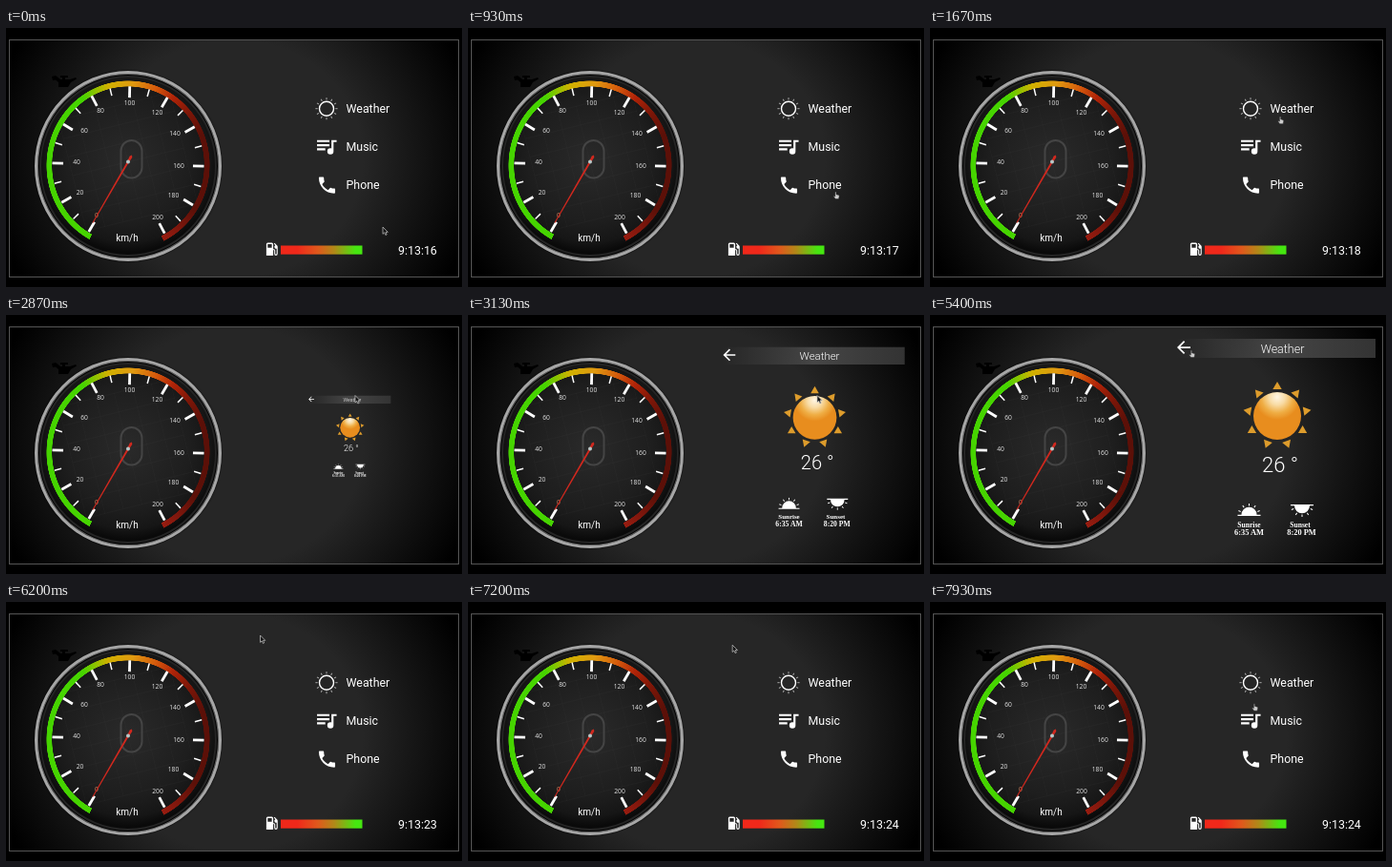
Animation, 478 px wide and 272 px high, one loop 8 s. Source, as an HTML page:

```html
<!DOCTYPE html>
<html lang="en">
<head>
<meta charset="utf-8">
<title>Dashboard</title>
<style>
html, body { margin: 0; width: 478px; height: 272px; overflow: hidden; background: #000; }
div, svg { position: absolute; box-sizing: border-box; }
#panel { left: 3px; top: 12px; width: 472px; height: 250px; border: 1px solid #555;
  background: radial-gradient(ellipse 260px 240px, #262626 52%, #000); }
#ring { left: 30px; top: 45px; width: 196px; height: 200px; border: 3px solid #a6a6a6; border-radius: 50%;
  background: radial-gradient(circle at 50% 47%, #2a2a2a, #1e1e1e 65px, #161616 86px, #0a0a0a 96px);
  box-shadow: inset 0 0 0 1px #555, inset 0 0 0 2px #000, inset 0 0 0 4px #242424, 0 0 2px #000; }
#arc { left: 42px; top: 57.5px; width: 172px; height: 172px; transform: rotate(1.2deg) scaleY(1.035);
  background: conic-gradient(from -153deg, #46d400 0 117deg, #d0b000 137deg, #e09a10 155deg,
    #d45a0c 172deg, #b02408 186deg, #7a1608 203deg, #5c1008 220deg 275deg, #981c10 306deg, transparent 306deg);
  -webkit-mask: radial-gradient(circle, transparent 79.5px, #000 80px 85.3px, transparent 85.8px);
  mask: radial-gradient(circle, transparent 79.5px, #000 80px 85.3px, transparent 85.8px); }
svg { left: 0; top: 0; }
text { fill: #fff; font: 300 12.5px Roboto, sans-serif; }
#menu text { font-weight: 400; font-size: 12.4px; }
.mid text, text.mid { text-anchor: middle; }
#labels text { font: 6.7px "Open Sans", sans-serif; fill: #e6e6e6; text-anchor: middle; }
#weather .small { font: bold 7.6px "Liberation Serif", serif; }
#weather .hour { font: bold 8.4px "Liberation Serif", serif; }
</style>
</head>
<body>
<div id="panel"></div>
<div id="ring"></div>
<div id="arc"></div>
<svg width="478" height="272" viewBox="0 0 478 272">
  <defs>
    <linearGradient id="fuel">
      <stop offset=".2" stop-color="#f0281a"/><stop offset=".45" stop-color="#e0581c"/>
      <stop offset=".66" stop-color="#b08a18"/><stop offset=".92" stop-color="#45e610"/>
    </linearGradient>
    <linearGradient id="bar">
      <stop offset="0" stop-color="#444" stop-opacity="0"/><stop offset=".5" stop-color="#464646"/><stop offset="1" stop-color="#333"/>
    </linearGradient>
    <radialGradient id="glow" gradientUnits="userSpaceOnUse" cx="364" cy="86" r="24">
      <stop offset="0" stop-color="#fff6e4"/><stop offset=".35" stop-color="#f8dca6"/>
      <stop offset=".7" stop-color="#efae45"/><stop offset="1" stop-color="#e88d1e"/>
    </radialGradient>
  </defs>

  <path d="M48 51l4-1 5 4h2v-2h-2v-2h8v2h-3v2h5l6-2 1 1.5-6 3.5-3 5H55v-5l-3-2.500-3 .5z"/>
  <g id="grid" stroke="#fff" stroke-opacity=".02" transform="rotate(-14 128 140.500)"></g>
  <rect x="120.500" y="118" width="22" height="39.500" rx="11" fill="none" stroke="#444" stroke-width="2"/>
  <g id="marks" transform="translate(128 143.500) rotate(1.200) scale(1 1.035)"></g>
  <g id="labels"></g>
  <text class="mid" x="127" y="224.300" style="font-weight:400;font-size:10px">km/h</text>
  <path d="M0-8L1.500-6 1 0 .5 74H-.5L-1 0-1.500-6z" fill="#d0281e" transform="translate(128 140.500) rotate(30)"/>
  <circle cx="128" cy="140.500" r="2" fill="#b9c8c8"/>

  <g id="menu" fill="#fff">
    <circle cx="336" cy="84.700" r="7.500" fill="none" stroke="#fff" stroke-width="1.400"/>
    <g id="rays" opacity=".6"></g>
    <path transform="translate(322.800 111.200) scale(1.080)" d="M15 6H3v2h12zm0 4H3v2h12zM3 16h8v-2H3zM17 6v8.180c-.31-.11-.65-.18-1-.18a3 3 0 1 0 3 3V8h3V6z"/>
    <path transform="translate(325.100 153.700) scale(.95)" d="M6.620 10.790c1.440 2.830 3.760 5.140 6.590 6.590l2.200-2.200c.27-.27.67-.36 1.020-.24 1.120.37 2.330.57 3.570.57.55 0 1 .45 1 1V20c0 .55-.45 1-1 1C10.610 21 3 13.390 3 4c0-.55.45-1 1-1h3.500c.55 0 1 .45 1 1 0 1.250.2 2.450.57 3.570.11.35.03.74-.25 1.020z"/>
    <text x="356.500" y="89.200">Weather</text>
    <text x="356.500" y="129.200">Music</text>
    <text x="356.500" y="169.200">Phone</text>
    <path transform="translate(270 223.200) scale(.72 .75)" fill-rule="evenodd" d="M19.770 7.230L16.060 3.500 15 4.560l2.110 2.110A2.500 2.500 0 0 0 19 11.290v7.210a1 1 0 0 1-2 0V14a2 2 0 0 0-2-2h-1V5a2 2 0 0 0-2-2H6a2 2 0 0 0-2 2v16h10v-7.500h1.500v5a2.500 2.500 0 0 0 5 0V9c0-.69-.28-1.320-.73-1.770zM12 10H6V5h6z"/>
    <rect x="288" y="228.500" width="85.500" height="9.200" fill="url(#fuel)"/>
    <text id="clock" x="411" y="238"></text>
  </g>

  <g id="weather" class="mid" fill="#fff">
    <rect x="258" y="25" width="209" height="20" fill="url(#bar)"/>
    <path transform="translate(255.500 23.500) scale(.875)" d="M20 11H7.830l5.590-5.590L12 4l-8 8 8 8 1.410-1.410L7.830 13H20z"/>
    <text x="369.500" y="39.500">Weather</text>
    <g id="beams" fill="#dd9c2c"></g>
    <circle cx="364" cy="106" r="25" fill="url(#glow)"/>
    <text x="367" y="165" style="font-size:22px">26 °</text>
    <g id="rise"><path d="M-12 0H12V-1.300H8A8 8 0 0 0-8-1.300H-12z"/></g>
    <text class="small" x="334.500" y="222.500">Sunrise</text>
    <text class="hour" x="334.500" y="231">6:35 AM</text>
    <g id="set"><path d="M-12 0H12V-1.300H8A8 8 0 0 0-8-1.300H-12z"/></g>
    <text class="small" x="388" y="222.500">Sunset</text>
    <text class="hour" x="389.500" y="231">8:20 PM</text>
  </g>

  <g id="cursor">
    <path id="arrow" d="M0 0V9.200L2.100 7.300 3.600 10.600 5.200 9.900 3.800 6.700H6.600z" fill="#151515" stroke="#c8c8c8" stroke-width=".9"/>
    <path id="hand" d="M-.8 0Q0-.8.7 0V3L4 4Q4.800 4.200 4.600 5.500L3.800 9H-.4L-3 5.600Q-2.600 4.500-.8 5.800z" fill="#ccc" stroke="#222" stroke-width=".6"/>
  </g>
</svg>
<script>
const $ = id => document.getElementById(id);
const add = (id, markup) => $(id).insertAdjacentHTML("beforeend", markup);
const show = (id, on) => $(id).style.display = on ? "" : "none";
const tick = (id, cx, cy, angle, r1, r2, width) =>
  add(id, `<path d="M0 ${-r1}V${-r2}" stroke="#fff" stroke-width="${width}" transform="translate(${cx} ${cy}) rotate(${angle})"/>`);

// Dial: 1.5 degrees per km/h, 100 at the top
for (let v = 0; v <= 200; v += 10) {
  const major = v % 20 == 0;
  tick("marks", 0, 0, (v - 100) * 1.5, major ? 68 : 72, 79.5, major ? 2.8 : 1.5);
}
[[95, 197], [77.5, 173], [74, 141], [82, 108], [99, 87], [129.5, 78.5],
 [158.5, 88.5], [177, 111], [181, 144.5], [175.5, 176], [159, 199]].forEach(([x, y], i) =>
  add("labels", `<text x="${x}" y="${y + 2.4}"${i ? "" : ' style="fill:#d9835f"'}>${i * 20}</text>`));
for (let d = -60; d <= 60; d += 20)
  add("grid", `<path d="M${128 + d} 80V201M68 ${140.5 + d}H188"/>`);

for (let a = 0; a < 360; a += 30) tick("rays", 336, 84.7, a, 9.3, 11.6, 1);
for (let a = 0; a < 360; a += 40)
  add("beams", `<path d="M-4.700-28H4.700L0-36z" transform="translate(364 106) rotate(${a})"/>`);
for (const a of [-68, -34, 0, 34, 68])
  for (const id of ["rise", "set"]) tick(id, 0, -1, a, 9.5, 12, 1);
$("rise").setAttribute("transform", "translate(334.500 211)");
$("set").setAttribute("transform", "translate(390 199) scale(1 -1)");

// Pointer stops: time, x, y, easing power of the way there
const stops = [
  [0, 395, 209, 1], [533, 395, 209, 1], [1400, 369, 109, 1.3], [2000, 366, 84.5, .56],
  [4400, 366, 84.5, 1], [5267, 282, 40, 1.2], [5667, 266.5, 35, .6],
  [6733, 266.5, 35, 1], [7600, 299, 66, 1.8], [7933, 340, 107, 1], [8000, 340, 107, 1]
];
function pointer(t) {
  const i = Math.max(1, stops.findIndex(s => s[0] > t));
  const [t0, x0, y0] = stops[i - 1], [t1, x1, y1, power] = stops[i];
  const p = ((t - t0) / (t1 - t0)) ** power;
  return [x0 + (x1 - x0) * p, y0 + (y1 - y0) * p];
}

function draw(now) {
  // 15 pictures a second
  const t = Math.floor((now % 8000 + 4) * 3 / 200) * 200 / 3 % 8000;
  const weather = t > 2730 && t < 6060;
  show("menu", !weather);
  show("weather", weather);

  const scale = Math.sin(Math.min(1, Math.max(0, (t - 2710) / 576)) * Math.PI / 2);
  $("weather").setAttribute("transform", `translate(358.300 127) scale(${scale}) translate(-358.300 -127)`);

  const second = t < 6000 ? 16 + Math.floor((t + 600.01) / 1000) : t < 7199 ? 23 : 24;
  $("clock").textContent = "9:13:" + second;

  const [x, y] = pointer(t);
  const hand = weather ? x < 283 && y < 45 : x > 322 && x < 403 && y > 65 && y < 185;
  show("hand", hand);
  show("arrow", !hand);
  $("cursor").setAttribute("transform", `translate(${x} ${y}) scale(.800)`);
}

const start = performance.now();
function frame() {
  draw(performance.now() - start);
  requestAnimationFrame(frame);
}
frame();
</script>
</body>
</html>
```
